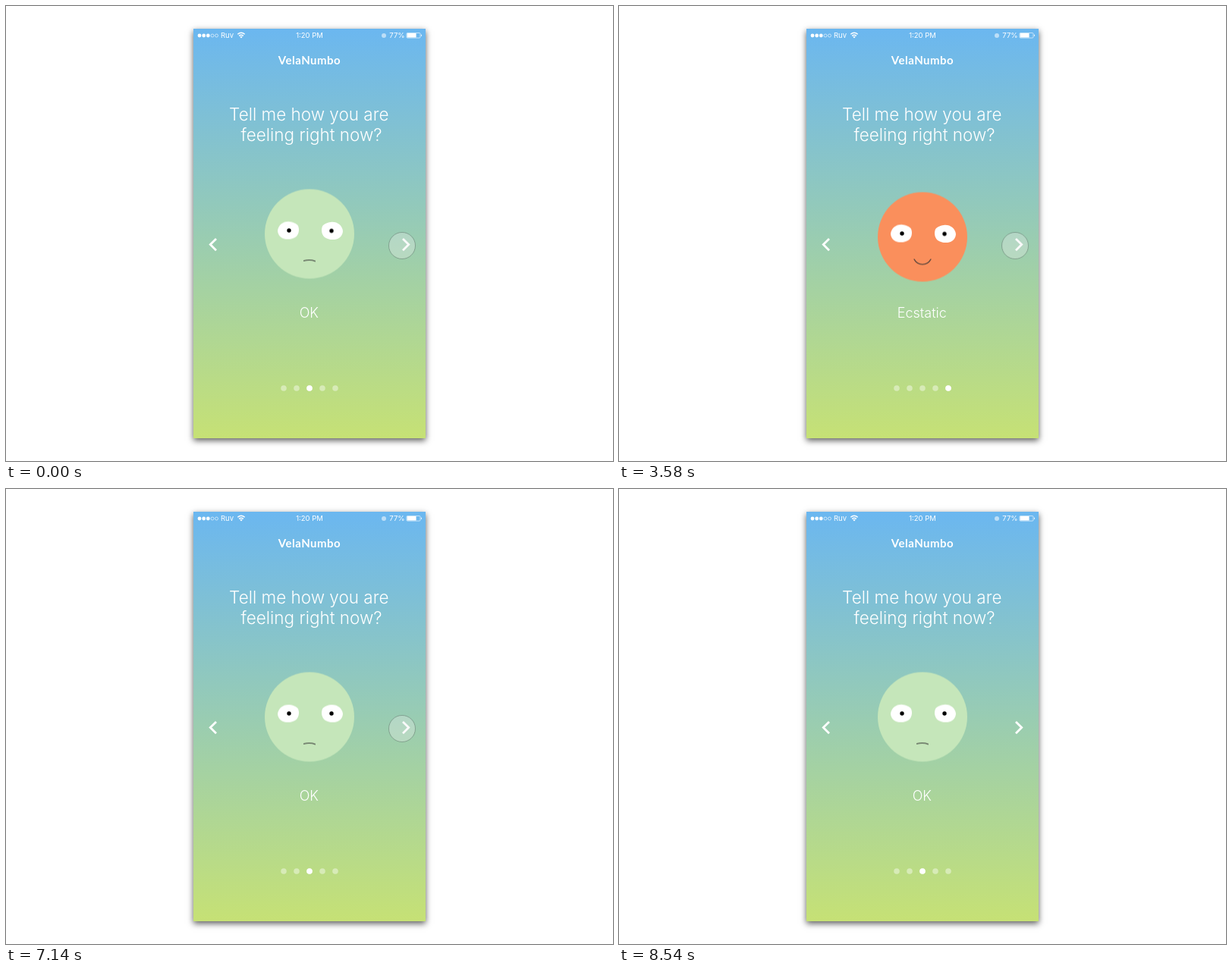
An HTML page for the animation above (9600 ms loop, 800 by 600 pixels).

```html
<!DOCTYPE html>
<html lang="en">
<head>
<meta charset="utf-8">
<title>Mood picker</title>
<style>
html, body { margin: 0; width: 100%; height: 100%; overflow: hidden; background: #fff; }
.phone {
  position: absolute; left: 247px; top: 30px; width: 306px; height: 540px;
  background: linear-gradient(#6bb7f0, #c6e175);
  box-shadow: 0 3px 8px rgba(0, 0, 0, .65);
}
svg { position: absolute; left: 0; top: 0; width: 800px; height: 600px; }
text { font-family: Inter, "Open Sans", sans-serif; fill: #fff; text-anchor: middle; }
.bar text { font-size: 9.5px; }
.title { font: 700 15px Lato, sans-serif; letter-spacing: .5px; }
.ask { font-size: 22.5px; font-weight: 300; }
.labels text { font-size: 18px; font-weight: 300; }
.line { fill: none; stroke: #fff; }

.face, .face *, .mood, .cursor, .cursor * { animation: 9600ms ease infinite; }
.face { animation-name: bob; }
.skin { animation-name: tint; }
.eyes { animation-name: blink; transform-origin: 0 -4px; }
.right { animation-name: side; --in: 2px; }
.white { animation-name: lid; fill: #fff; }
.pupil { animation-name: look; --in: 0px; }
.right .pupil { --in: 2px; }
.mouth { animation-name: mouth; fill: none; stroke: #333; stroke-width: 1.1; stroke-linecap: round; }
.m1 { animation-name: m1; }
.m2 { animation-name: m2; }
.m3 { animation-name: m3; }
.m4 { animation-name: m4; }
.m5 { animation-name: m5; }
.cursor { animation-name: travel; }
.cursor circle { animation-name: press; animation-timing-function: linear; fill: #eee; stroke: #53675e; stroke-opacity: .45; }

/* Mood order: OK, happy, ecstatic, depressed, sad, OK */
@keyframes bob {
  0%, 10.42% { transform: translate(400px, 300.5px); }
  13.54%, 71.35% { transform: translate(400px, 304.5px); }
  74.48%, 100% { transform: translate(400px, 300.5px); }
}
@keyframes tint {
  0%, 10.42% { fill: #c5e6ba; }
  13.54%, 23.96% { fill: #ffca3a; }
  27.08%, 38.02% { fill: #fa8f5c; }
  41.15%, 53.65% { fill: #9c87c2; }
  56.77%, 71.35% { fill: #96aef0; }
  74.48%, 100% { fill: #c5e6ba; }
}
@keyframes lid {
  0%, 38.02% {
    d: path("M-42 -4 C-41 -12 -34 -17 -26 -16 C-21 -15.5 -15 -13 -14.5 -9 C-13 -4 -15 2 -18 4 C-25 9 -41 9 -42 -4 Z");
  }
  41.15%, 53.65% {
    d: path("M-41 -2 C-36 -3 -31 -3 -26 -5 C-21 -6.5 -17 -8.5 -13.5 -10.5 C-12.5 -6 -15 1 -19 4 C-26 8.5 -39 7 -41 -2 Z");
  }
  56.77%, 71.35% {
    d: path("M-41 -4 C-37 -8 -32 -10.5 -26 -11 C-21 -11.5 -17 -11.5 -14.5 -11 C-13 -6 -15 0 -18 3 C-25 8.5 -37 7 -41 -4 Z");
  }
  74.48%, 100% {
    d: path("M-42 -4 C-41 -12 -34 -17 -26 -16 C-21 -15.5 -15 -13 -14.5 -9 C-13 -4 -15 2 -18 4 C-25 9 -41 9 -42 -4 Z");
  }
}
@keyframes side {
  0%, 38.02% { transform: translate(2px, .5px) scaleX(-1); }
  41.15%, 53.65% { transform: translate(-2px, 0px) scaleX(-1); }
  56.77%, 100% { transform: translate(2px, 0px) scaleX(-1); }
}
@keyframes look {
  0%, 38.02% { transform: translate(-27px, -4.5px); }
  41.15%, 53.65% { transform: translate(calc(-27px + var(--in)), 2.5px); }
  56.77%, 71.35% { transform: translate(-27px, -1px); }
  74.48%, 100% { transform: translate(-27px, -4.5px); }
}
@keyframes mouth {
  0%, 10.42% { d: path("M-7.5 35.5 C-3 34.3 3 34.3 7.5 36"); }
  13.54%, 23.96% { d: path("M-7.5 31.5 C-4 36.6 4 36.6 7.5 31.5"); }
  27.08%, 38.02% { d: path("M-11 29.5 C-6 38.5 6 38.5 11 29.5"); }
  41.15%, 53.65% { d: path("M-7.5 37 C-5 31.6 5 31.6 7.5 37"); }
  56.77%, 71.35% { d: path("M-7.5 36.5 C-3 35 3 35 7.5 37.3"); }
  74.48%, 100% { d: path("M-7.5 35.5 C-3 34.3 3 34.3 7.5 36"); }
}
@keyframes blink {
  0%, .2%, 1.9%, 87.3%, 88.96%, 100% { transform: scaleY(1); }
  1%, 88.1% { transform: scaleY(.08); }
}
@keyframes m1 { 0%, 38.02%, 56.77%, 100% { opacity: 0; } 41.15%, 53.65% { opacity: 1; } }
@keyframes m2 { 0%, 53.65%, 74.48%, 100% { opacity: 0; } 56.77%, 71.35% { opacity: 1; } }
@keyframes m3 { 0%, 10.42%, 74.48%, 100% { opacity: 1; } 13.54%, 71.35% { opacity: 0; } }
@keyframes m4 { 0%, 10.42%, 27.08%, 100% { opacity: 0; } 13.54%, 23.96% { opacity: 1; } }
@keyframes m5 { 0%, 23.96%, 41.15%, 100% { opacity: 0; } 27.08%, 38.02% { opacity: 1; } }
@keyframes travel {
  0%, 75.6% { transform: translate(522px, 316px); animation-timing-function: ease-in; }
  77.5% { transform: translate(346px, 322px); animation-timing-function: ease-out; }
  80.2%, 100% { transform: translate(288px, 324px); }
  0%, 80.6% { opacity: 1; }
  83.3%, 100% { opacity: 0; }
}
@keyframes press {
  0%, 9.7%, 12%, 23.3%, 25.6%, 37.3%, 39.6%, 52.9%, 55.2%, 70.6%, 72.9%, 100% {
    transform: scale(1); fill-opacity: .32;
  }
  10.5%, 24.1%, 38.1%, 53.7%, 71.4% { transform: scale(.87); fill-opacity: .6; }
}
</style>
</head>
<body>
<div class="phone"></div>
<svg viewBox="0 0 800 600">
  <g class="bar" fill="#fff">
    <circle cx="255" cy="39" r="2.4"/>
    <circle cx="260.7" cy="39" r="2.4"/>
    <circle cx="266.3" cy="39" r="2.4"/>
    <circle class="line" cx="272" cy="39" r="2" stroke-width=".6"/>
    <circle class="line" cx="277.5" cy="39" r="2" stroke-width=".6"/>
    <text x="291.5" y="42">Ruv</text>
    <path class="line" stroke-width="1.4" d="M305.3 37.3 Q310 33 314.7 37.3 M307.2 39.4 Q310 37 312.8 39.4"/>
    <path d="M308.2 40.6 Q310 39.2 311.8 40.6 L310 42.5 Z"/>
    <text x="400" y="42">1:20 PM</text>
    <circle cx="498" cy="39" r="3" opacity=".55"/>
    <text x="515.5" y="42">77%</text>
    <rect class="line" x="528" y="35.5" width="18" height="6.6" rx="1.2" stroke-width=".6"/>
    <rect x="528.6" y="36" width="12" height="5.6" rx=".6"/>
    <path d="M547 37.3 Q549 38.8 547 40.3 Z"/>
  </g>
  <text class="title" x="400" y="77">VelaNumbo</text>
  <text class="ask" x="399.3" y="151">Tell me how you are</text>
  <text class="ask" x="402.5" y="178">feeling right now?</text>

  <g class="face">
    <circle class="skin" r="59"/>
    <g class="eyes">
      <g>
        <path class="white"/>
        <circle class="pupil" r="2.7"/>
      </g>
      <g class="right">
        <path class="white"/>
        <circle class="pupil" r="2.7"/>
      </g>
    </g>
    <path class="mouth"/>
  </g>

  <g class="labels">
    <text class="mood m1" x="399.3" y="411">Depressed</text>
    <text class="mood m2" x="399.3" y="411">Sad</text>
    <text class="mood m3" x="399.3" y="411">OK</text>
    <text class="mood m4" x="399.3" y="411">Happy</text>
    <text class="mood m5" x="399.3" y="411">Ecstatic</text>
  </g>

  <g fill="#fff" fill-opacity=".42">
    <circle cx="366" cy="504" r="3.8"/>
    <circle cx="383" cy="504" r="3.8"/>
    <circle cx="400" cy="504" r="3.8"/>
    <circle cx="417" cy="504" r="3.8"/>
    <circle cx="434" cy="504" r="3.8"/>
  </g>
  <g fill="#fff">
    <circle class="mood m1" cx="366" cy="504" r="3.8"/>
    <circle class="mood m2" cx="383" cy="504" r="3.8"/>
    <circle class="mood m3" cx="400" cy="504" r="3.8"/>
    <circle class="mood m4" cx="417" cy="504" r="3.8"/>
    <circle class="mood m5" cx="434" cy="504" r="3.8"/>
  </g>

  <path class="line" stroke-width="2.8" d="M277 307 L269.3 314.6 L277 322.2 M523 307 L530.7 314.6 L523 322.2"/>
  <g class="cursor"><circle r="17.5"/></g>
</svg>
</body>
</html>
```
